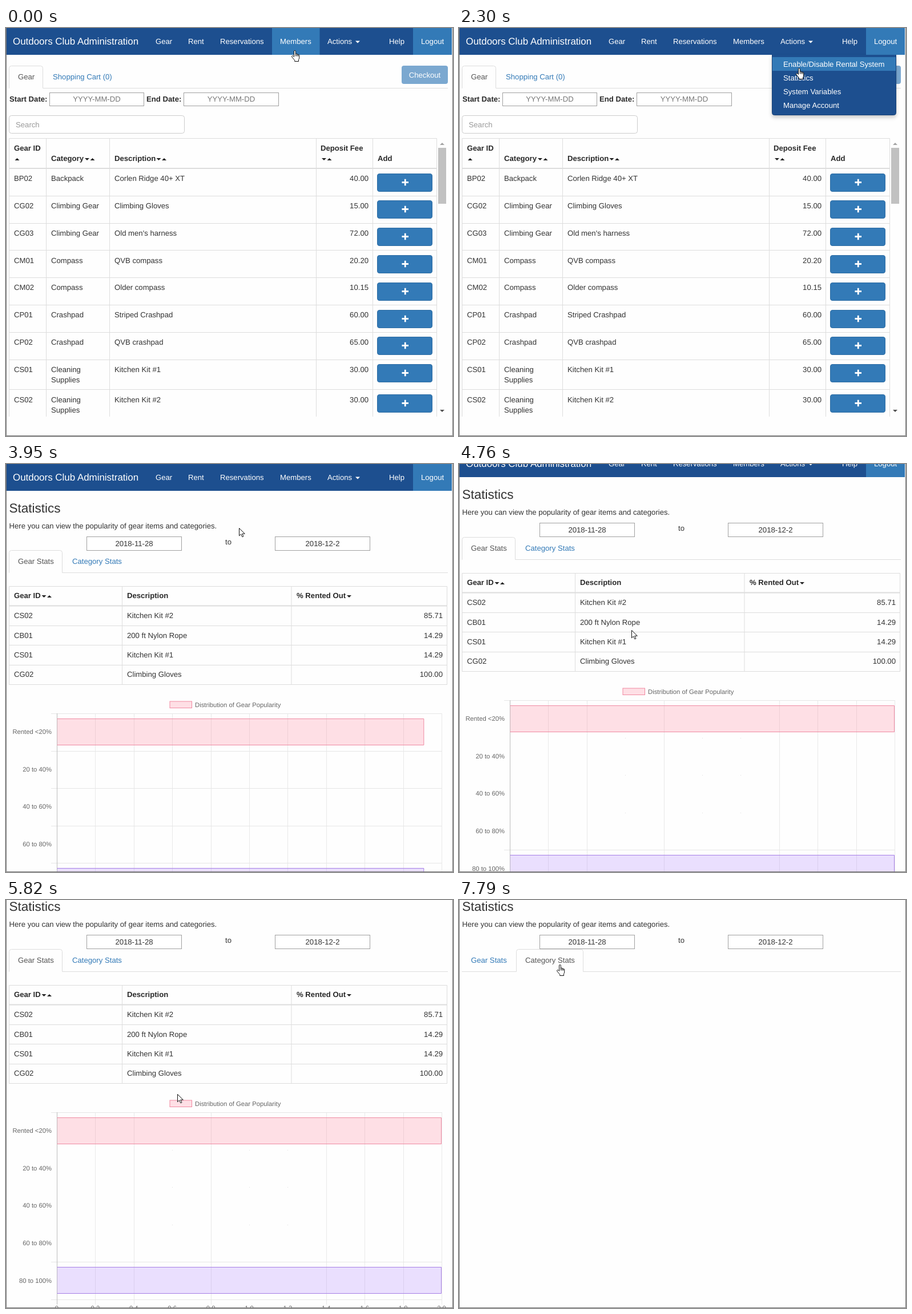
Recreate the animation shown at these times as an HTML page. Size 783 px wide and 715 px high, loop 8 s.

```html
<!DOCTYPE html>
<html lang="en">
<head>
<meta charset="utf-8">
<title>Outdoors Club Administration</title>
<style>
  html, body { margin: 0; width: 100%; height: 100%; overflow: hidden; background: #fefefe; }
  svg { display: block; width: 100%; height: 100%; }
  text { font: 13.15px "Liberation Sans", Arial, sans-serif; fill: #333; text-rendering: geometricPrecision; white-space: pre; }
  .b { font-weight: bold; fill: #292929; }
  .w { fill: #fff; }
  .link { fill: #337ab7; }
  .tabOn { fill: #555; }
  .hint { fill: #777; }
  .end { text-anchor: end; }
  .mid { text-anchor: middle; }
  .chart text { font-size: 11.28px; fill: #666; }
  #menu { filter: drop-shadow(0 4px 3px rgba(0, 0, 0, .2)); }
</style>
</head>
<body>
<svg id="stage" viewBox="0 0 783 715" xmlns="http://www.w3.org/2000/svg"></svg>
<script>
const LOOP = 8000, NAVY = '#1d4f8f', BLUE = '#337ab7', PAPER = '#fefefe';
const stage = document.getElementById('stage');

// y is the visual middle of the capitals
const text = (x, y, s, cls = '') => `<text x="${x}" y="${y + 4.6}" class="${cls}">${s}</text>`;
const rect = (x, y, w, h, fill, more = '') =>
  `<rect x="${x}" y="${y}" width="${w}" height="${h}" fill="${fill}" ${more}/>`;
const line = (d, color = '#ddd', w = 1) => `<path d="${d}" fill="none" stroke="${color}" stroke-width="${w}"/>`;
const down = (x, y, c = '#222') => `<path d="M${x - 4} ${y - 2}h8l-4 4z" fill="${c}"/>`;
const up = (x, y, c = '#222') => `<path d="M${x - 4} ${y + 2}h8l-4-4z" fill="${c}"/>`;
const sorter = (x, y) => down(x, y) + up(x + 9.5, y);
const box = (x, y, w, h, color, r = 0) => rect(x + .5, y + .5, w - 1, h - 1, '#fff', `stroke="${color}" rx="${r}"`);
const tab = (x0, x1, y, fill = PAPER, edge = '#ddd') =>
  `<path d="M${x0} ${y + 39.6}V${y + 4}q0-4 4-4H${x1 - 4}q4 0 4 4V${y + 39.6}" fill="${fill}"/>` +
  line(`M${x0} ${y + 39}V${y + 4}q0-4 4-4H${x1 - 4}q4 0 4 4V${y + 39}`, edge);
const group = (id, body, more = '') => `<g id="${id}" ${more}>${body}</g>`;

function navBar() {
  const items = [[262, 'Gear'], [319, 'Rent'], [375, 'Reservations'], [480, 'Members'], [563, 'Actions'], [671, 'Help'], [727, 'Logout']];
  return rect(0, 0, 781, 47, NAVY) + rect(713, 0, 68, 47, BLUE) +
    rect(466, 0, 83.5, 47, BLUE, 'id="members"') +
    `<text x="12" y="29.4" class="w" style="font-size:16.93px">Outdoors Club Administration</text>` +
    items.map(([x, s]) => text(x, 23, s, 'w')).join('') + down(616, 24.5, '#fff');
}

function menu() {
  const items = ['Enable/Disable Rental System', 'Statistics', 'System Variables', 'Manage Account'];
  return `<path d="M548.500 47V148.500q0 4 4 4H761.500q4 0 4-4V47" fill="${NAVY}" stroke="#194379"/>` +
    rect(549, 51, 216, 24, BLUE, 'id="hover"') +
    items.map((s, i) => text(568, 63 + 24 * i, s, 'w')).join('') +
    rect(549, 76, 216, 24, 'none', 'id="menuRing" stroke="#4d90fe" stroke-width="2" rx="1"');
}

function gearPage() {
  const rows = [
    ['BP02', 'Backpack', 'Corlen Ridge 40+ XT', '40.00'],
    ['CG02', 'Climbing Gear', 'Climbing Gloves', '15.00'],
    ['CG03', 'Climbing Gear', "Old men's harness", '72.00'],
    ['CM01', 'Compass', 'QVB compass', '20.20'],
    ['CM02', 'Compass', 'Older compass', '10.15'],
    ['CP01', 'Crashpad', 'Striped Crashpad', '60.00'],
    ['CP02', 'Crashpad', 'QVB crashpad', '65.00'],
    ['CS01', 'Cleaning Supplies', 'Kitchen Kit #1', '30.00'],
    ['CS02', 'Cleaning Supplies', 'Kitchen Kit #2', '30.00']];
  let s = line('M5 105.500H774') + tab(5.5, 64.5, 66.5) +
    text(21, 85, 'Gear', 'tabOn') + text(82, 85, 'Shopping Cart (0)', 'link') +
    rect(693, 66, 81, 32, '#7ba8d0', 'rx="4"') + text(733.5, 82, 'Checkout', 'w mid') +
    text(6, 124.5, 'Start Date:', 'b') + box(76, 113, 166, 24, '#a0a0a0') + text(159, 124.5, 'YYYY-MM-DD', 'hint mid') +
    text(246, 124.5, 'End Date:', 'b') + box(311, 113, 167, 24, '#a0a0a0') + text(394.5, 124.5, 'YYYY-MM-DD', 'hint mid') +
    box(5, 153, 308, 32, '#ccc', 4) + `<text x="17" y="173.5" style="fill:#999">Search</text>`;

  s += line('M5.500 681V193.500H754.500V681') + line('M5 246H755', '#ddd', 2) +
    [70, 181, 543, 642].map(x => line(`M${x + .5} 193V681`)).join('') +
    text(14, 210, 'Gear ID', 'b') + up(19.5, 230) +
    text(79, 228.5, 'Category', 'b') + sorter(142, 230) +
    text(190, 228.5, 'Description', 'b') + sorter(267.5, 230) +
    text(551, 210, 'Deposit Fee', 'b') + sorter(557, 230) + text(651, 228.5, 'Add', 'b');

  rows.forEach(([id, kind, name, fee], i) => {
    const y = 263.5 + 47.8 * i + (i > 7 ? 5 : 0), top = Math.floor(y - 8.5);
    if (i) s += line(`M5 ${Math.round(y - 8.5) - 8.5}H755`);
    s += text(14, y, id) + text(190, y, name) + text(635, y, fee, 'end') +
      kind.split(i > 6 ? ' ' : '|').map((w, k) => text(79, y + 18.7 * k, w)).join('') +
      rect(650.5, top + .5, 96, 31, BLUE, 'rx="3.5" stroke="#2e6da4"') +
      line(`M693.500 ${top + 15.5}h11.500M699.250 ${top + 9.7}v11.500`, '#fff', 2.8);
  });
  return s + rect(757, 210, 14, 98, '#c1c1c1') + up(764, 203, '#a3a3a3') + down(764, 671, '#505050');
}

function tableHead(a, b, bottom) {
  return line(`M5.500 ${bottom}V214.500H772.500V${bottom}`) + line('M5 248.500H773', '#ddd', 2) +
    line(`M${a - .5} 214V${bottom}M${b - .5} 214V${bottom}`) +
    text(14, 230.5, 'Gear ID', 'b') + sorter(66.5, 232) + text(a + 8, 230.5, 'Description', 'b') +
    text(b + 8.5, 230.5, '% Rented Out', 'b') + down(b + 100.5, 232);
}

function gearTable() {
  const rows = [['CS02', 'Kitchen Kit #2', '85.71'], ['CB01', '200 ft Nylon Rope', '14.29'],
    ['CS01', 'Kitchen Kit #1', '14.29'], ['CG02', 'Climbing Gloves', '100.00']];
  return tableHead(204, 500.5, 387) + rows.map(([id, name, pct], i) => {
    const y = 265.5 + 34.4 * i;
    return text(14, y, id) + text(212, y, name) + text(765, y, pct, 'end') +
      line(`M5 ${Math.round(y + 17.5) + .5}H773`);
  }).join('');
}

const colX = k => Math.round(89 + 67.4 * k) + .5;
const rowY = k => Math.round(437 + 65.6 * k) + .5;

function grid(sparse) {
  const gap = [3, 5, 6];
  let s = '';
  for (let k = 1; k <= 10; k++) {
    if (!(sparse && gap.includes(k))) s += line(`M${colX(k)} 437V774`, '#e9e9e9');
    else for (let r = 1; r < 4; r++) s += rect(colX(k) - .5, rowY(r) - .5, 1, 1, '#ddd');
  }
  for (let k = 0; k <= 5; k++)
    if (!sparse || k < 1 || k > 3) s += line(`M79 ${rowY(k)}H763`, '#e6e6e6');
  return s + line('M89.500 437V774', '#bdbdbd');
}

function chart() {
  const labels = ['Rented &lt;20%', '20 to 40%', '40 to 60%', '60 to 80%', '80 to 100%'];
  let s = rect(287, 416, 38.5, 11.5, 'rgba(255,99,132,.2)', 'stroke="#f28aa2"') + text(331, 421.6, 'Distribution of Gear Popularity') +
    group('grid', grid(false)) + group('sparse', grid(true)) +
    '<path id="low" fill="rgba(255,99,132,.2)" stroke="#ef8aa2"/><path id="high" fill="rgba(153,102,255,.2)" stroke="#a67fe6"/>';
  labels.forEach((w, k) => s += text(80, 468.6 + 65.6 * k, w, 'end'));
  for (let k = 0; k <= 10; k++) s += text(89 + 67.4 * k, 779, k ? (k / 5).toFixed(1) : '0', 'mid');
  return s;
}

function statsHead() {
  return '<text x="5.500" y="85" style="font-size:22.5px">Statistics</text>' +
    text(5.5, 108.3, 'Here you can view the popularity of gear items and categories.') +
    box(141, 127, 167, 25, '#a0a0a0') + text(224.5, 139.5, '2018-11-28', 'mid') + text(389.5, 136, 'to', 'mid') +
    box(471, 127, 167, 25, '#a0a0a0') + text(554.5, 139.5, '2018-12-2', 'mid');
}

function statsBody() {
  const gearOn = tab(5.5, 98.5, 151.5) + text(21, 170.5, 'Gear Stats', 'tabOn') +
    group('tabHover', tab(101.5, 217.5, 151.5, '#eee', '#eee') + line('M101 190.500H218')) + text(116, 170.5, 'Category Stats', 'link') +
    rect(101, 151.5, 117, 39.5, 'none', 'id="tabRing" stroke="#4d90fe" stroke-width="2" rx="4"');
  const catOn = tab(100.5, 217.5, 151.5) + text(21, 170.5, 'Gear Stats', 'link') + text(116, 170.5, 'Category Stats', 'tabOn');
  return line('M5 190.500H774') + group('gearOn', gearOn) + group('catOn', catOn) +
    group('empty', tableHead(227.5, 467.5, 249)) +
    group('full', gearTable() + group('chart', chart(), 'class="chart"'));
}

const cursors = group('arrow', '<path d="M.5 .5V13.800l3.100-2.900 2.300 4.900 2.100-1-2.200-4.600h4.500z" fill="#fff" stroke="#111"/>') +
  group('hand', '<path d="M-.5 11.500V1.900a1.400 1.400 0 0 1 2.800 0V7a1.100 1.100 0 0 1 2.200 0v1a1.100 1.100 0 0 1 2.200 0v.8a1 1 0 0 1 2 0V13q0 2-1.200 3.500v3H.7v-2L-4 12q-1-1.500.2-2.200t2.300.7z" fill="#fff" stroke="#111"/>' +
    line('M2.300 7v3.500M4.500 8v2.500M6.700 8.800v2', '#111')) +
  group('beam', line('M-3 -6.500h2.500l.5 .5 .5-.5H3M0-6V6M-3 6.500h2.500l.5-.5 .5 .5H3', '#222'));

stage.innerHTML = rect(0, 0, 783, 715, PAPER) +
  group('body', group('gear', gearPage()) + group('stats', statsBody())) +
  group('head', group('title', statsHead()) + navBar()) +
  group('menu', menu()) + group('cursor', cursors) +
  line('M.5 0V714.500H782.500V0', '#747474');

const el = id => document.getElementById(id);
const show = (id, on) => el(id).setAttribute('display', on ? 'inline' : 'none');
const move = (id, x, y) => el(id).setAttribute('transform', `translate(${x} ${y})`);

// pointer stops: time, x, y
const stops = [
  [0, 505, 39], [120, 556, 37], [240, 610, 33], [400, 615, 33], [520, 605, 30], [770, 605, 29], [1640, 604, 30],
  [1790, 603, 34], [1910, 601, 42], [2030, 599, 53], [2150, 597, 61], [2300, 595, 70], [2420, 591, 83],
  [3530, 591, 83], [3680, 585, 83], [3800, 480, 87], [3950, 408, 112], [4070, 363, 140], [4220, 315, 185],
  [4340, 284, 232], [4460, 291, 263], [4620, 302, 291], [5310, 302, 305], [5430, 302, 325], [5550, 302, 344],
  [5820, 300, 340], [5940, 292, 327], [6070, 280, 312], [6220, 277, 303], [6340, 274, 299], [6460, 273, 297.5],
  [6610, 235, 240], [6730, 214, 206], [6880, 200, 175], [7000, 190, 148], [7120, 181, 127], [7270, 176, 113]];

function draw(t) {
  const [step, x, y] = stops.filter(s => s[0] <= t).pop();
  const stats = t >= 2940, category = t >= 7670;

  show('members', t < 120);
  show('gear', !stats);
  show('stats', stats);
  show('title', stats);
  show('menu', t >= 920 && !stats);
  show('hover', t >= 2030);
  el('hover').setAttribute('y', t < 2420 ? 51 : 75);
  show('menuRing', t >= 2790);

  show('empty', t < 3530);
  show('full', t >= 3530 && !category);
  show('gearOn', !category);
  show('catOn', category);
  show('tabHover', t >= 7270);
  show('tabRing', t >= 7520);

  // half-pixel scroll, each block snapped to whole pixels
  const scroll = t < 4760 ? 0 : t < 4880 ? 23.5 : 65.5;
  move('head', 0, -Math.ceil(scroll));
  move('body', 0, -Math.floor(scroll));
  show('grid', !scroll);
  show('sparse', scroll);

  // bars ease out (quartic), stepping with the pointer
  const p = Math.min(1, Math.max(0, (step - 3455) / 920));
  const end = 89 + 673.5 * (1 - (1 - p) ** 4);
  const bar = top => `M89.500 ${top}H${end}V${top + 46}H89.500`;
  el('low').setAttribute('d', bar(446.5));
  el('high').setAttribute('d', bar(708.5));

  const hand = !stats || t >= 7270, beam = t >= 6220 && t < 6610;
  show('hand', hand);
  show('beam', beam);
  show('arrow', !hand && !beam);
  move('cursor', x, y);
}

const start = performance.now();
function tick() {
  draw((performance.now() - start) % LOOP);
  requestAnimationFrame(tick);
}
tick();
</script>
</body>
</html>
```
